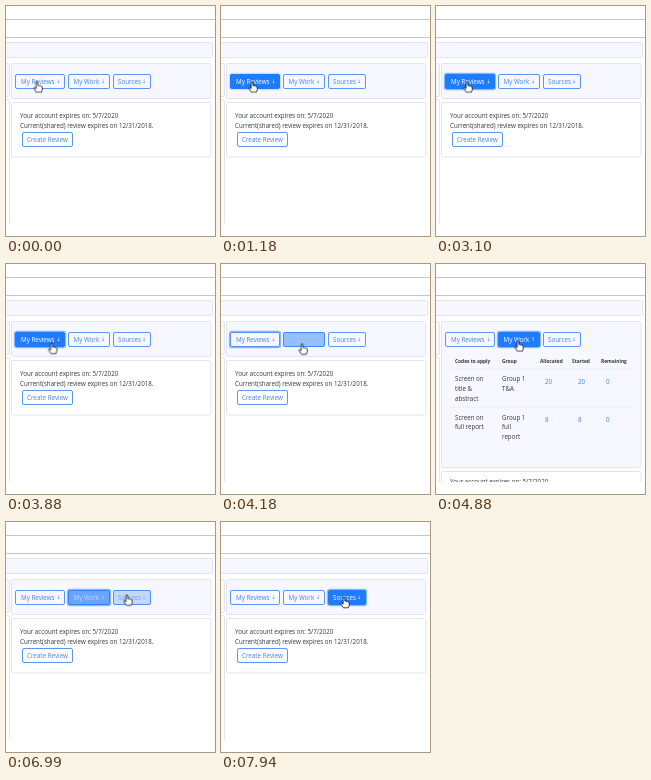
Write an HTML page that moves like this. It is 209 by 230 pixels and loops after 8 s.

```html
<!DOCTYPE html>
<html lang="en">
<head>
<meta charset="utf-8">
<title>Review home</title>
<style>
  html, body { margin: 0; width: 100%; height: 100%; overflow: hidden; background: #fff; }
  svg { display: block; width: 209px; height: 230px; font: 6.2px "Open Sans", "Noto Sans", sans-serif; fill: #33373c; }
  .bar { fill: none; stroke: #c6c6ca; }
  .line { fill: none; stroke: #e6e7ee; stroke-width: .6; }
  .panel { fill: #f6f7ff; stroke: #e4e5ec; }
  .white { fill: #fff; }
  .link { fill: #4583f2; }
  .muted { fill: #9a9fa6; }
  .btn { font-size: 6.25px; fill: #4583f2; }
  .btn .edge { fill: none; stroke: #5a96fa; }
  .btn .on { fill: #fff; }
  .btn .on rect { fill: #1f7bff; stroke: #1f7bff; }
  .ring { fill: none; stroke: #1f7bff; stroke-opacity: .5; stroke-width: 1.3; }
  .arrow { font: 5px "DejaVu Sans", sans-serif; }
  .sort { font-size: 6.5px; }
  .head { font-weight: 700; font-size: 4.85px; }

  .on, .ring, .up, .down, .closed, .reviews, .work, .hand { animation: 8s linear infinite; }
  .up, .down, .closed, .reviews, .work { animation-timing-function: step-end; }

  .reviews, .b1 .up { animation-name: reviews-open; }
  .work, .b2 .up { animation-name: work-open; }
  .b1 .down { animation-name: reviews-shut; }
  .b2 .down { animation-name: work-shut; }
  .closed { animation-name: all-shut; }
  @keyframes reviews-open { 0%, 38.75% { opacity: 0 } 17.125% { opacity: 1 } 100% { opacity: 0 } }
  @keyframes reviews-shut { 0%, 38.75% { opacity: 1 } 17.125% { opacity: 0 } 100% { opacity: 1 } }
  @keyframes work-open { 0%, 80.125% { opacity: 0 } 61% { opacity: 1 } 100% { opacity: 0 } }
  @keyframes work-shut { 0%, 80.125% { opacity: 1 } 61% { opacity: 0 } 100% { opacity: 1 } }
  @keyframes all-shut { 0%, 38.75%, 80.125%, 100% { opacity: 1 } 17.125%, 61% { opacity: 0 } }

  .b1 .on { animation-name: fill1; }
  .b2 .on { animation-name: fill2; }
  .b3 .on { animation-name: fill3; }
  @keyframes fill1 { 0%, .5% { opacity: 0 } 2.25%, 49.25% { opacity: 1 } 51.25%, 100% { opacity: 0 } }
  @keyframes fill2 { 0%, 51.25% { opacity: 0 } 53.5%, 86.6% { opacity: 1 } 88.9%, 100% { opacity: 0 } }
  @keyframes fill3 { 0%, 86.9% { opacity: 0 } 88.9%, 100% { opacity: 1 } }

  .b1 .ring { animation-name: ring1; }
  .b2 .ring { animation-name: ring2; }
  .b3 .ring { animation-name: ring3; }
  @keyframes ring1 { 0%, 14.3% { opacity: 0 } 15.5%, 59.3% { opacity: 1 } 60.5%, 100% { opacity: 0 } }
  @keyframes ring2 { 0%, 59.3% { opacity: 0 } 60.5%, 98.2% { opacity: 1 } 99.2%, 100% { opacity: 0 } }
  @keyframes ring3 { 0%, 98.2% { opacity: 0 } 99.2%, 100% { opacity: 1 } }

  .hand { animation-name: hand; fill: #fff; stroke: #111; stroke-width: .8; stroke-linejoin: round; }
  @keyframes hand {
    0%, 47% { transform: translate(31px, 75.5px) }
    50% { transform: translate(60px, 82px) }
    52.25% { transform: translate(81px, 79.5px) }
    53.75%, 85.1% { transform: translate(82px, 76.5px) }
    86.2% { transform: translate(104px, 76px) }
    87.4% { transform: translate(121px, 72.5px) }
    91.9%, 100% { transform: translate(123px, 75px) }
  }
</style>
</head>
<body>
<svg viewBox="0 0 209 230">
  <defs><clipPath id="view"><path d="M0 0H209V217.5H0z"/></clipPath></defs>
  <g clip-path="url(#view)">
    <path class="bar" d="M0 13.5H209M0 31.5H209"/>
    <rect class="panel" x="-9" y="36.5" width="215.5" height="15" rx="1"/>
    <rect class="panel" x="-9" y="57.5" width="12.5" height="33" rx="1.5"/>
    <rect class="panel white" x="-9" y="93.5" width="12.5" height="140" rx="1.5"/>

    <g class="closed">
      <rect class="panel" x="5.5" y="57.5" width="199.5" height="35" rx="1.5"/>
      <rect class="panel white" x="5.5" y="96.5" width="199.5" height="54.5" rx="1.5"/>
      <text x="14" y="112.3">Your account expires on: 5/7/2020</text>
      <text x="14" y="121.8">Current(shared) review expires on 12/31/2018.</text>
      <g class="btn">
        <rect class="edge" x="16.5" y="126.5" width="50" height="14" rx="1.5"/>
        <text x="21" y="135.7">Create Review</text>
      </g>
    </g>

    <g class="reviews">
      <rect class="panel" x="5.5" y="57.5" width="199.5" height="180" rx="1.5"/>
      <path fill="#fff" d="M14 86H190V218H14z"/>
      <path fill="#fcfcff" d="M14 86H190V104.5H14zM14 134H190V156H14zM14 178H190V218H14z"/>
      <path class="line" d="M14.3 218V86.3H195.5V218M14 104.5H190M47 86V104.5M136 86V104.5"/>
      <path fill="#f9f3f4" d="M190 87H195V218H190z"/>
      <path fill="#999" d="M191.3 91L192.5 89.5L193.7 91z"/>
      <text x="19" y="97.4">ID</text>
      <text x="52" y="97.4">Review Name</text>
      <text x="141" y="97.4">Last Access:</text>
      <text x="181.5" y="96" class="link arrow sort">↓</text>
      <text x="19" y="121.2">17249</text>
      <text x="19" y="147">319</text>
      <text x="19" y="169">838</text>
      <text x="19" y="199.7">4474</text>
      <g class="link">
        <text x="52" y="116.5">Kurt Boldane's example</text>
        <text x="52" y="126">non-shareable review</text>
        <text x="52" y="147">OLMA-Screener 4 demo</text>
        <text x="52" y="169" class="muted">TALQO</text>
        <text x="52" y="190.2">DOVAN: (Real) Community</text>
        <text x="52" y="199.7">Engagement Review</text>
        <text x="52" y="209.2">Update and Beyond 2014</text>
      </g>
      <text x="141" y="121.2">2/7/2019</text>
      <text x="141" y="147">2/4/2019</text>
      <text x="141" y="169">2/4/2019</text>
      <text x="141" y="199.7">1/30/2019</text>
    </g>

    <g class="work">
      <rect class="panel" x="5.5" y="57.5" width="199.5" height="146" rx="1.5"/>
      <rect class="panel white" x="5.5" y="207.5" width="199.5" height="54.5" rx="1.5"/>
      <path class="line" d="M14 105H198M14 143H198"/>
      <g class="head">
        <text x="19" y="98.8">Codes to apply</text>
        <text x="66" y="98.8">Group</text>
        <text x="104" y="98.8">Allocated</text>
        <text x="136" y="98.8">Started</text>
        <text x="165" y="98.8">Remaining</text>
      </g>
      <text x="19" y="117.3">Screen on</text>
      <text x="19" y="126.9">title &amp;</text>
      <text x="19" y="136.5">abstract</text>
      <text x="66" y="117.3">Group 1</text>
      <text x="66" y="126.9">T&amp;A</text>
      <text x="19" y="155.8">Screen on</text>
      <text x="19" y="165.4">full report</text>
      <text x="66" y="155.8">Group 1</text>
      <text x="66" y="165.4">full</text>
      <text x="66" y="175">report</text>
      <g class="link">
        <text x="109" y="120">20</text>
        <text x="142" y="120">20</text>
        <text x="170" y="120">0</text>
        <text x="109" y="158.3">8</text>
        <text x="142" y="158.3">8</text>
        <text x="170" y="158.3">0</text>
      </g>
      <text x="14" y="220.3">Your account expires on: 5/7/2020</text>
    </g>

    <g class="btn b1">
      <rect class="edge" x="9.5" y="68.5" width="49" height="14" rx="1.5"/>
      <text x="15" y="77.6">My Reviews</text>
      <text class="arrow down" x="50.5" y="77.2">↓</text>
      <g class="on">
        <rect x="9.5" y="68.5" width="49" height="14" rx="1.5"/>
        <text x="15" y="77.6">My Reviews</text>
        <text class="arrow down" x="50.5" y="77.2">↓</text>
        <text class="arrow up" x="50.5" y="77.2">↑</text>
      </g>
      <rect class="ring" x="8.5" y="67.5" width="51" height="16" rx="2.2"/>
    </g>
    <g class="btn b2">
      <rect class="edge" x="62.5" y="68.5" width="41" height="14" rx="1.5"/>
      <text x="67.5" y="77.6">My Work</text>
      <text class="arrow down" x="95" y="77.2">↓</text>
      <g class="on">
        <rect x="62.5" y="68.5" width="41" height="14" rx="1.5"/>
        <text x="67.5" y="77.6">My Work</text>
        <text class="arrow down" x="95" y="77.2">↓</text>
        <text class="arrow up" x="95" y="77.2">↑</text>
      </g>
      <rect class="ring" x="61.5" y="67.5" width="43" height="16" rx="2.2"/>
    </g>
    <g class="btn b3">
      <rect class="edge" x="107.5" y="68.5" width="37" height="14" rx="1.5"/>
      <text x="112" y="77.6">Sources</text>
      <text class="arrow" x="136" y="77.2">↓</text>
      <g class="on">
        <rect x="107.5" y="68.5" width="37" height="14" rx="1.5"/>
        <text x="112" y="77.6">Sources</text>
        <text class="arrow" x="136" y="77.2">↓</text>
      </g>
      <rect class="ring" x="106.5" y="67.5" width="39" height="16" rx="2.2"/>
    </g>

    <path class="hand" d="M-.9 .8Q0-.4 .9 .8V4.2Q2 3.5 2.6 4.5Q3.7 4 4.1 5Q5.3 4.8 5.3 6V8.2L4.3 10.8H-.6L-3 7.3Q-3.4 6-2.3 6L-.9 7.2z"/>
  </g>
</svg>
</body>
</html>
```
